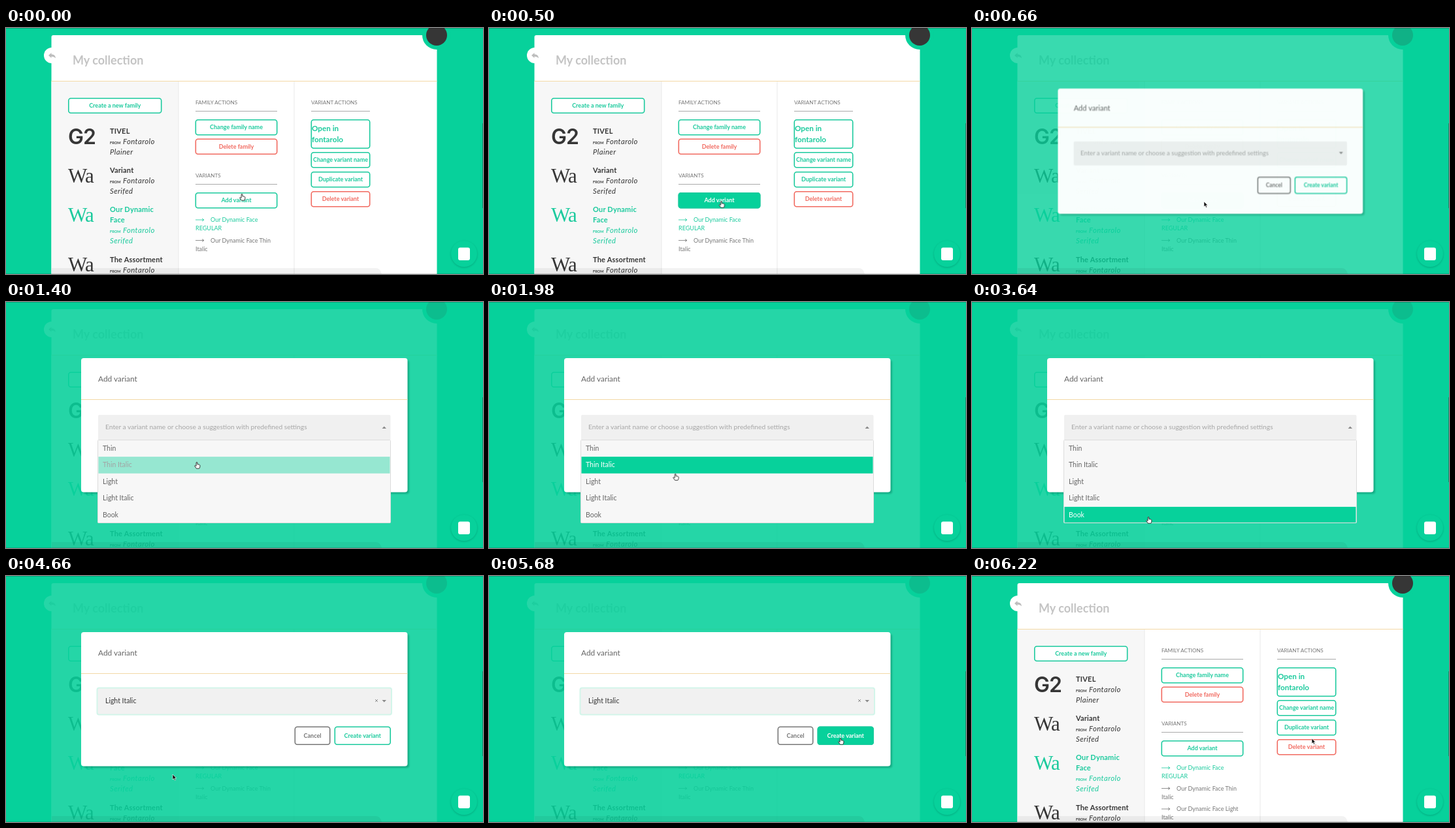
Recreate the animation shown at these times as an HTML page. Size 730 by 377 pixels, loop 6240 ms.

```html
<!DOCTYPE html>
<html lang="en">
<head>
<meta charset="utf-8">
<title>Add variant</title>
<style>
  html, body { margin: 0; width: 100%; height: 100%; overflow: hidden; background: #07d19b; }
  svg { display: block; width: 100vw; height: 100vh; font-family: Lato, "Open Sans", sans-serif; }
  text { fill: currentColor; white-space: pre; }
  .bold { font-weight: 700; }
  .name { font-weight: 700; letter-spacing: .2px; }
  .origin { font-style: italic; letter-spacing: .4px; }
  .sans { font-family: Inter, sans-serif; font-weight: 600; letter-spacing: -1px; }
  .serif { font-family: "Liberation Serif", serif; letter-spacing: -.8px; }
  .green { color: #1bca9d; }
  .red { color: #f16a60; }
  .grey { color: #777; }
  .pale { color: #c4c4c4; }
  .hint { color: #a6a6a6; }
  .dark { color: #363636; }
  .option { color: #666; }
  .frame { fill: #fff; stroke: currentColor; stroke-width: 1.6; }
  .full { fill: #07d19b; }
  .white { color: #fff; }

  .lit { opacity: 0; }
  .overlay, .modal, .lit, .swap, .cursor {
    animation-duration: 6240ms;
    animation-iteration-count: infinite;
  }
  .overlay { animation-name: overlay; animation-timing-function: ease; }
  .modal { animation-name: modal; animation-timing-function: ease; transform-origin: 364.5px 188.5px; }
  .lit { animation-timing-function: linear; }
  .swap { animation-timing-function: step-end; }
  .cursor { animation-name: cursor; animation-timing-function: ease-in-out; }

  .add .lit { animation-name: add; }
  .create .lit { animation-name: create; }
  .row0 .lit { animation-name: row0; }
  .row1 .lit { animation-name: row1; }
  .row2 .lit { animation-name: row2; }
  .row3 .lit { animation-name: row3; }
  .row4 .lit { animation-name: row4; }
  .menu { animation-name: menu; }
  .closed { animation-name: closed; }
  .empty { animation-name: empty; }
  .chosen { animation-name: chosen; }
  .added { animation-name: added; }
  .hand { animation-name: hand; }
  .arrow { animation-name: arrow; }

  @keyframes overlay {
    0%, 8.01% { opacity: 0; }
    12.02%, 92.63% { opacity: 1; }
    96.63%, 100% { opacity: 0; }
  }
  @keyframes modal {
    0%, 8.01% { opacity: 0; transform: scale(.25); }
    10.58% { opacity: .97; }
    12.02%, 92.63% { opacity: 1; transform: scale(1); }
    96.63%, 100% { opacity: 0; transform: scale(.25); }
  }

  /* hover fills fade in and drop out at once */
  @keyframes add {
    0%, .3% { opacity: 0; }
    3.2%, 10.6% { opacity: 1; }
    12.8%, 100% { opacity: 0; }
  }
  @keyframes create {
    0%, 83.97% { opacity: 0; }
    87.18%, 96.6% { opacity: 1; }
    96.7%, 100% { opacity: 0; }
  }
  @keyframes row0 {
    0%, 19.23% { opacity: 0; }
    20.5% { opacity: .27; }
    20.51%, 100% { opacity: 0; }
  }
  @keyframes row1 {
    0%, 20.51% { opacity: 0; }
    25.32%, 32.05% { opacity: 1; }
    32.06%, 100% { opacity: 0; }
  }
  @keyframes row2 {
    0%, 32.05% { opacity: 0; }
    36.86%, 40.38% { opacity: 1; }
    40.39%, 100% { opacity: 0; }
  }
  @keyframes row3 {
    0%, 40.38% { opacity: 0; }
    45.19%, 52.24% { opacity: 1; }
    52.25%, 63.46% { opacity: 0; }
    68.27%, 69.5% { opacity: 1; }
    69.51%, 100% { opacity: 0; }
  }
  @keyframes row4 {
    0%, 52.24% { opacity: 0; }
    57.05%, 63.46% { opacity: 1; }
    63.47%, 100% { opacity: 0; }
  }

  /* hard state changes */
  @keyframes menu { 0% { opacity: 0; } 19.23% { opacity: 1; } 69.23%, 100% { opacity: 0; } }
  @keyframes closed { 0% { opacity: 1; } 19.23% { opacity: 0; } 69.23%, 100% { opacity: 1; } }
  @keyframes empty { 0% { opacity: 1; } 69.23%, 100% { opacity: 0; } }
  @keyframes chosen { 0% { opacity: 0; } 69.23%, 100% { opacity: 1; } }
  @keyframes added { 0% { opacity: 0; } 92.95%, 100% { opacity: 1; } }
  @keyframes hand {
    0% { opacity: 1; } 8.65% { opacity: 0; } 19.55% { opacity: 1; }
    69.23% { opacity: 0; } 83.97% { opacity: 1; } 92.95%, 100% { opacity: 0; }
  }
  @keyframes arrow {
    0% { opacity: 0; } 8.65% { opacity: 1; } 19.55% { opacity: 0; }
    69.23% { opacity: 1; } 83.97% { opacity: 0; } 92.95%, 100% { opacity: 1; }
  }

  @keyframes cursor {
    0% { transform: translate(361px, 254px); }
    3.21% { transform: translate(357px, 262px); }
    10.58% { transform: translate(355px, 266px); }
    16.03%, 18.43% { transform: translate(329px, 196px); }
    22.44% { transform: translate(292px, 245px); }
    30.45% { transform: translate(288px, 250px); }
    32.05% { transform: translate(285px, 264px); }
    38.46% { transform: translate(272px, 280px); }
    40.38% { transform: translate(268px, 290px); }
    42.31% { transform: translate(265px, 299px); }
    49.68% { transform: translate(266px, 305px); }
    52.24% { transform: translate(268px, 315px); }
    58.33%, 61.86% { transform: translate(270px, 329px); }
    63.46% { transform: translate(268px, 313px); }
    67.31% { transform: translate(258px, 304px); }
    74.68%, 77% { transform: translate(255px, 304px); }
    84.94%, 92.63% { transform: translate(538px, 248px); }
    99.68%, 100% { transform: translate(520px, 249px); }
  }
</style>
</head>
<body>
<svg id="stage" viewBox="0 0 730 377" xmlns="http://www.w3.org/2000/svg"></svg>
<script>
const text = (x, y, size, label, cls = '', anchor = 'start') =>
  `<text x="${x}" y="${y}" font-size="${size}" class="${cls}" text-anchor="${anchor}">${label}</text>`;

const rect = (x, y, w, h, fill, more = '') =>
  `<rect x="${x}" y="${y}" width="${w}" height="${h}" fill="${fill}" ${more}/>`;

// A button takes its outer edges; "hover" adds a filled copy on top.
function button(left, top, right, bottom, label, cls, hover = false) {
  const box = kind => `<rect x="${left + .8}" y="${top + .8}" width="${right - left - 1.6}"
    height="${bottom - top - 1.6}" rx="3.5" class="${kind}"/>`;
  const caption = extra => text((left + right) / 2, (top + bottom) / 2 + 2.8, 9, label, 'bold ' + extra, 'middle');
  const lit = hover ? `<g class="lit">${box('frame full')}${caption('white')}</g>` : '';
  return `<g class="${cls}">${box('frame')}${caption('')}${lit}</g>`;
}

const heading = (x, y, right, label) =>
  text(x, y, 8.1, label, 'grey') + rect(x, y + 10, right - x, 1, '#a9a9a9');

function family(y, sample, sampleY, names, origin, cls) {
  const last = y + (names.length - 1) * 16;
  const [size, face] = sample === 'G2' ? [32, 'sans'] : [31, 'serif'];
  return `<g class="${cls}">
    ${text(95, sampleY, size, sample, face)}
    ${names.map((n, i) => text(159, y + i * 16, 11, n, 'name')).join('')}
    ${text(159, last + 16, 5.6, 'FROM', 'bold')}
    ${text(179, last + 16, 11.4, 'Fontarolo', 'origin')}
    ${text(159, last + 32, 11.4, origin, 'origin')}
  </g>`;
}

const variant = (y, first, second, cls) => `<g class="${cls}">
  <path d="M290 ${y - 3}h13m-3-2 3 2-3 2" fill="none" stroke="currentColor" stroke-width=".8"/>
  ${text(313, y, 9, first)}${text(290, y + 13, 9, second)}</g>`;

const page = `
  <circle cx="70" cy="42" r="12" fill="#fff"/>
  ${rect(69.5, 11, 590, 380, '#fff', 'rx="3"')}
  <path d="M65 42l4.5-4v2.3q6 .2 6.5 6-2.5-3-6.5-2.6v2.3z" fill="#bdbdbd"/>
  <circle cx="659" cy="11" r="22" fill="#07d19b"/>
  <circle cx="659" cy="11" r="16" fill="#363636"/>
  ${text(102, 55.5, 18, 'My collection', 'bold pale')}
  ${rect(69.5, 82, 194.5, 295, '#f7f7f7')}
  ${rect(263.5, 82, 1, 295, '#e9e9e9')}
  ${rect(440.5, 82, 1, 295, '#e9e9e9')}
  ${rect(69.5, 81, 590, 1, '#f3d9a6')}

  ${button(95, 107, 238.5, 131, 'Create a new family', 'green')}
  ${family(161.5, 'G2', 178, ['TIVEL'], 'Plainer', 'dark')}
  ${family(222, 'Wa', 236.5, ['Variant'], 'Serifed', 'dark')}
  ${family(282, 'Wa', 297, ['Our Dynamic', 'Face'], 'Serifed', 'green')}
  ${family(358.5, 'Wa', 373, ['The Assortment'], 'Serifed', 'dark')}

  ${heading(290, 117, 415, 'FAMILY ACTIONS')}
  ${button(289.5, 140, 415.5, 164.5, 'Change family name', 'green')}
  ${button(289.5, 169.5, 415.5, 194, 'Delete family', 'red')}
  ${heading(290, 229, 415, 'VARIANTS')}
  ${button(289.5, 252, 415.5, 276.5, 'Add variant', 'green add', true)}
  ${variant(297, 'Our Dynamic Face', 'REGULAR', 'green')}
  ${variant(328.5, 'Our Dynamic Face Thin', 'Italic', 'grey')}
  ${variant(360, 'Our Dynamic Face Light', 'Italic', 'grey swap added')}

  ${heading(467, 117, 557, 'VARIANT ACTIONS')}
  ${button(466.5, 140, 557.5, 185, '', 'green')}
  <g class="green">${text(468, 158, 11.7, 'Open in', 'bold')}${text(468, 175, 11.7, 'fontarolo', 'bold')}</g>
  ${button(466.5, 190, 557.5, 214.5, 'Change variant name', 'green')}
  ${button(466.5, 220, 557.5, 244.5, 'Duplicate variant', 'green')}
  ${button(466.5, 250, 557.5, 274.5, 'Delete variant', 'red')}`;

const option = (label, i) => {
  const y = 211.5 + i * 25.6;
  const caption = cls => text(148, y + 16, 10.5, label, cls);
  return `<g class="row${i}">${caption('option')}
    <g class="lit">${rect(141.5, y, 446, i < 4 ? 25.6 : 24, '#07d19b')}${caption('white')}</g></g>`;
};

const modal = `
  ${rect(118, 89, 499, 205, '#067a5c', 'rx="4" opacity=".45" filter="url(#soft)"')}
  ${rect(115, 86, 499.5, 205.5, '#fff', 'rx="4"')}
  ${text(141, 122, 11.9, 'Add variant', 'option')}
  ${rect(115, 149, 499.5, 1, '#f3d9a6')}
  <g class="swap chosen">${rect(139.5, 171.5, 450.5, 41, '#f1f1f1', 'rx="3" stroke="#d3f5ea" stroke-width="2"')}</g>
  <g class="swap empty">
    ${rect(141, 173, 447.5, 39, '#f0f0f0', 'rx="2"')}
    ${text(152, 195, 10.25, 'Enter a variant name or choose a suggestion with predefined settings', 'hint')}
  </g>
  <g class="swap chosen">
    ${text(152, 195, 10.5, 'Light Italic', 'dark')}
    <path d="M565 189l4 4m0-4-4 4" stroke="#888" stroke-width=".9"/>
  </g>
  <path class="swap closed" d="M575.5 190h6.5l-3.25 3.5z" fill="#888"/>
  ${button(441.5, 230.5, 496.5, 259, 'Cancel', 'grey')}
  ${button(502.5, 230.5, 589, 259, 'Create variant', 'green create', true)}
  <g class="swap menu">
    <path d="M575.5 194h6.5l-3.25-3.5z" fill="#888"/>
    ${rect(140.5, 211.5, 448, 127, '#f7f7f7', 'rx="1" stroke="#dcdcdc" stroke-width="1"')}
    ${['Thin', 'Thin Italic', 'Light', 'Light Italic', 'Book'].map(option).join('')}
  </g>`;

const chrome = `
  <circle cx="701" cy="347" r="20.5" fill="#045f48" opacity=".25" filter="url(#soft)"/>
  <circle cx="701" cy="346" r="20" fill="#07d19b"/>
  ${rect(692, 336.5, 18, 19.5, '#fff', 'rx="3"')}
  <path d="M70 377v-9h496q7 0 9 9z" fill="#000" opacity=".05"/>
  ${rect(0, 0, 730, 1, '#000', 'opacity=".2"')}
  ${rect(0, 376, 730, 1, '#000', 'opacity=".14"')}
  ${rect(729, 146, 1, 130, '#333', 'opacity=".45"')}`;

const cursor = `
  <path class="swap arrow" d="M0 0v8l1.9-1.7 1.3 2.9 1.4-.6-1.3-2.8h2.5z"
    fill="#111" stroke="#fff" stroke-width=".6"/>
  <path class="swap hand" d="M-.9 1q.9-1.5 1.8 0v2.8q3.6 0 4 1.4v2q-.3 2-1.2 3h-4.3q-1.5-2.3-2.9-4 .3-1.4 2.6.2z"
    fill="#fff" stroke="#222" stroke-width=".9"/>`;

document.getElementById('stage').innerHTML = `
  <defs><filter id="soft" x="-20%" y="-20%" width="140%" height="140%">
    <feGaussianBlur stdDeviation="1.2"/></filter></defs>
  ${rect(0, 0, 730, 377, '#07d19b')}
  ${page}
  <g class="overlay">${rect(0, 0, 730, 377, '#07d19b', 'opacity=".88"')}</g>
  <g class="modal">${modal}</g>
  ${chrome}
  <g class="cursor">${cursor}</g>`;
</script>
</body>
</html>
```
